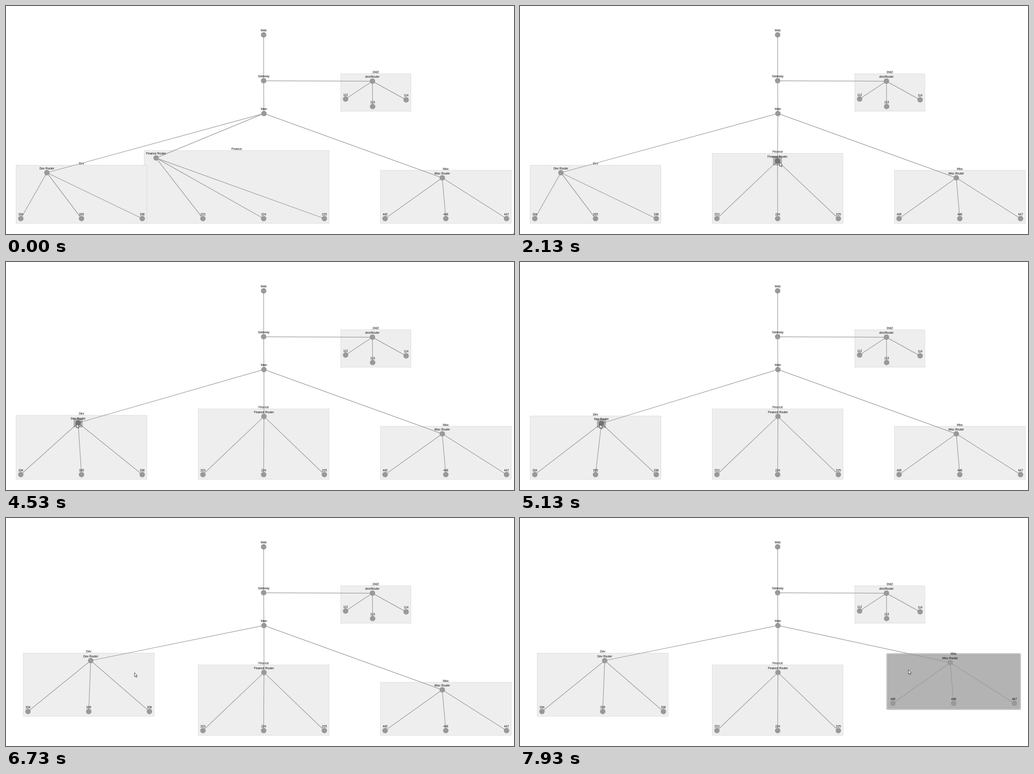
Animation of 1116x502 px, one loop 8 s. Source, as an HTML page with a canvas:

```html
<!DOCTYPE html>
<html lang="en">
<head>
<meta charset="utf-8">
<title>Network map</title>
<style>
  html, body { margin: 0; width: 100%; height: 100%; overflow: hidden; background: #fff; }
  canvas { display: block; width: 1116px; height: 502px; }
</style>
</head>
<body>
<canvas id="stage" width="1116" height="502"></canvas>
<script>
const ctx = document.getElementById('stage').getContext('2d');
const LOOP = 8000, STEP = 1000 / 15;
const RADIUS = 6, PAD = 4;
const FONT = '6.4px "Liberation Sans", Arial, Helvetica, sans-serif';

const nodes = [];
const add = (label, x, y, parent, group) => nodes.push({ label, x, y, parent, group });

// Three evenly spaced leaves below a router
function addSubnet(group, x, y, left, first) {
  const router = group + ' Router';
  add(router, x, y, 'Main', group);
  for (let i = 0; i < 3; i++) add(String(first + i), left + 133.4 * i, 468, router, group);
}

add('Web', 566, 63.6);
add('Gateway', 566, 164.6, 'Web');
add('Main', 566.6, 236.7, 'Gateway');
add('dmzRouter', 805, 165.6, 'Gateway', 'DMZ');
add('112', 746, 204.8, 'dmzRouter', 'DMZ');
add('113', 805.4, 221.3, 'dmzRouter', 'DMZ');
add('114', 879, 206.6, 'dmzRouter', 'DMZ');
addSubnet('Finance', 329.7, 334.6, 432.6, 223);
addSubnet('Dev', 89.8, 367, 32.5, 334);
addSubnet('Misc', 958.4, 378.3, 832.8, 445);

const groups = ['DMZ', 'Finance', 'Dev', 'Misc'];

// Pointer path: step, x, y
const path = [
  [1, 1115, 500], [6, 720, 390], [12, 290, 294], [14, 319, 327],
  [16, 328, 337.5], [21, 329, 338], [22, 334, 337], [26, 485, 348],
  [29, 567, 344.5], [32, 570, 343.5], [37, 570, 343.5], [39, 571, 342.5],
  [48, 571, 342.5], [52, 400, 299], [56, 126, 333], [62, 86, 368.5],
  [69, 163, 355], [73, 178, 355], [77, 175, 357], [81, 166.5, 357.5],
  [83, 166.5, 357.5], [93, 263, 382], [94, 266, 382], [98, 281.5, 340],
  [101, 282, 340], [107, 877, 392], [109, 866.5, 394], [119, 853, 334]
];

// What is grabbed, and the steps of press and release
const drags = [
  { id: 'Finance Router', from: 22, to: 39 },
  { id: 'Dev Router', from: 62, to: 81 },
  { id: 'Dev', from: 94, to: 100 },
  { id: 'Misc', from: 109, to: 120 }
];

const secant = (i, c) => (path[i + 1][c] - path[i][c]) / (path[i + 1][0] - path[i][0]);

// Monotone slope: flat at turns and rests
function slope(i, c) {
  if (i === 0) return secant(0, c);
  if (i === path.length - 1) return secant(i - 1, c);
  const a = secant(i - 1, c), b = secant(i, c);
  return a * b > 0 ? 2 * a * b / (a + b) : 0;
}

function pointer(k) {
  k = Math.max(path[0][0], Math.min(k, path[path.length - 1][0]));
  const i = Math.max(1, path.findIndex(p => p[0] >= k)) - 1;
  const p = path[i], q = path[i + 1], w = q[0] - p[0], f = (k - p[0]) / w, g = 1 - f;
  return [1, 2].map(c =>
    p[c] * (1 + 2 * f) * g * g + q[c] * (3 - 2 * f) * f * f +
    w * f * g * (slope(i, c) * g - slope(i + 1, c) * f));
}

function place(node, k) {
  let { x, y } = node;
  for (const d of drags) {
    if (k < d.from || (d.id !== node.label && d.id !== node.group)) continue;
    const a = pointer(d.from), b = pointer(Math.min(k, d.to));
    x += b[0] - a[0];
    y += b[1] - a[1];
  }
  return { ...node, x, y };
}

function bounds(list) {
  let l = Infinity, t = Infinity, r = -Infinity, b = -Infinity;
  for (const n of list) {
    const half = Math.max(RADIUS, ctx.measureText(n.label).width / 2) + PAD + 0.4;
    l = Math.min(l, n.x - half);
    r = Math.max(r, n.x + half);
    t = Math.min(t, n.y - 16.5);
    b = Math.max(b, n.y + RADIUS + PAD + 0.4);
  }
  return [l, t, r - l, b - t];
}

function shade(x, y, w, h) {
  ctx.fillStyle = 'rgba(0,0,0,0.25)';
  ctx.beginPath();
  ctx.roundRect(x - PAD, y - PAD, w + 2 * PAD, h + 2 * PAD, 3);
  ctx.fill();
}

function text(label, x, bottom) {
  ctx.fillStyle = '#000';
  ctx.fillText(label, x, bottom - 1.3);
}

function drawGroup(name, all, held) {
  const box = bounds(all.filter(n => n.group === name));
  ctx.fillStyle = '#eee';
  ctx.fillRect(...box);
  ctx.strokeStyle = '#ccc';
  ctx.lineWidth = 0.6;
  ctx.strokeRect(...box);
  if (held === name) shade(...box);
  text(name, box[0] + box[2] / 2, box[1]);
}

function drawEdge(a, b) {
  ctx.beginPath();
  ctx.moveTo(a.x, a.y);
  ctx.lineTo(b.x, b.y);
  ctx.stroke();
}

function drawNode(n, held) {
  ctx.fillStyle = '#999';
  ctx.beginPath();
  ctx.arc(n.x, n.y, RADIUS, 0, 2 * Math.PI);
  ctx.fill();
  if (held === n.label) shade(n.x - RADIUS, n.y - RADIUS, 2 * RADIUS, 2 * RADIUS);
  text(n.label, n.x, n.y - RADIUS);
}

const arrow = new Path2D('M0.4 0.4V9.6L2.5 7.7L4 11L5.3 10.4L3.9 7.2H6.7Z');

function drawPointer([x, y]) {
  ctx.save();
  ctx.translate(x, y);
  ctx.fillStyle = '#fff';
  ctx.fill(arrow);
  ctx.strokeStyle = '#222';
  ctx.lineWidth = 0.8;
  ctx.stroke(arrow);
  ctx.restore();
}

function draw(k) {
  ctx.fillStyle = '#fff';
  ctx.fillRect(0, 0, 1116, 502);
  ctx.font = FONT;
  ctx.textAlign = 'center';
  const all = nodes.map(n => place(n, k));
  const held = drags.find(d => k >= d.from && k < d.to)?.id;
  groups.forEach(g => drawGroup(g, all, held));
  ctx.strokeStyle = '#999';
  ctx.lineWidth = 1.25;
  for (const n of all) {
    if (n.parent) drawEdge(all.find(p => p.label === n.parent), n);
  }
  all.forEach(n => drawNode(n, held));
  drawPointer(pointer(k));
}

const start = performance.now();
function tick() {
  const t = (performance.now() - start) % LOOP;
  draw(Math.min(119, Math.floor((t + 5) / STEP)));
  requestAnimationFrame(tick);
}
tick();
</script>
</body>
</html>
```
